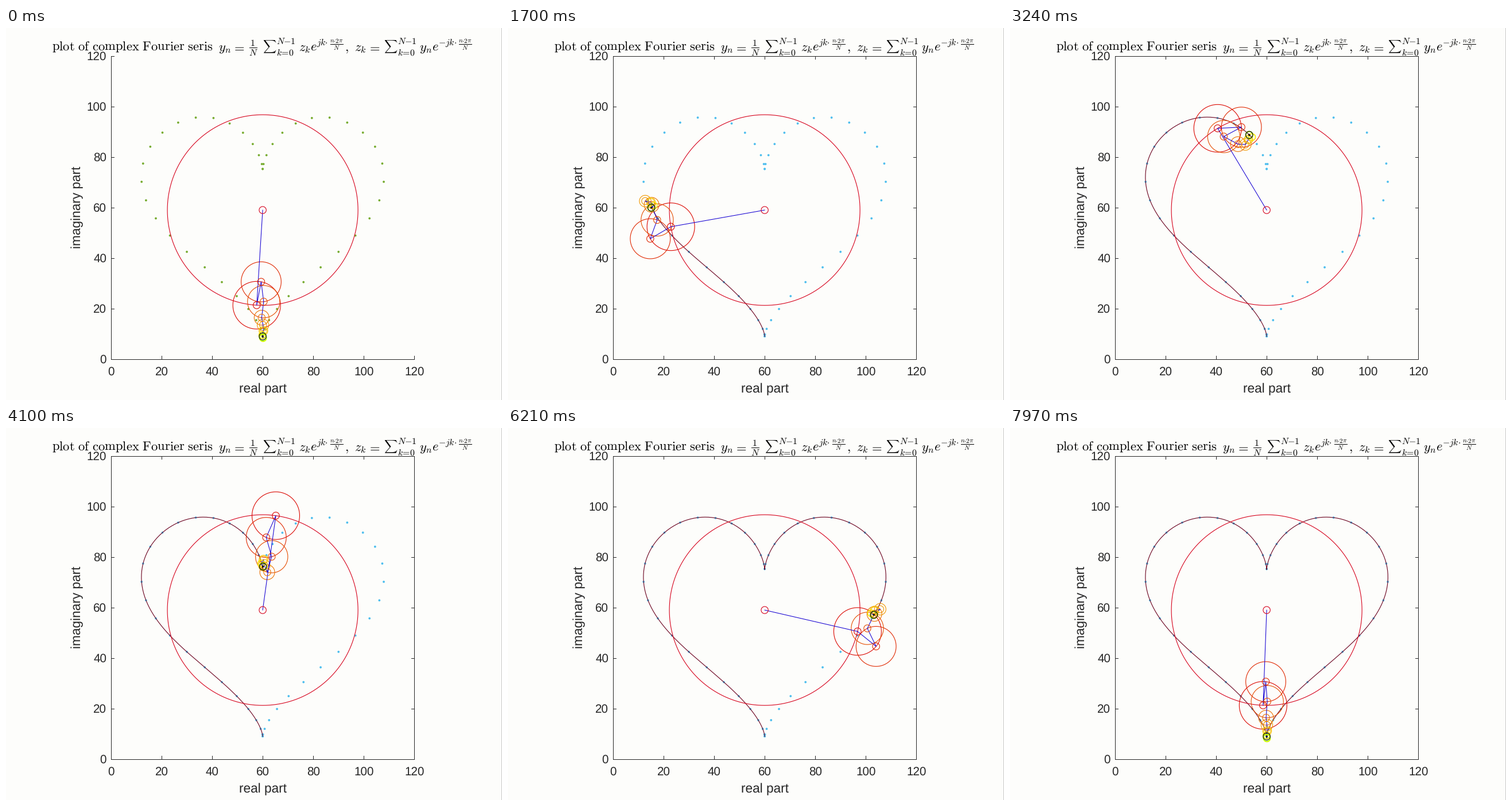
Write a matplotlib script that moves like this. It is 864 px wide and 648 px high and loops after 8000 ms.

```python
import colorsys

import matplotlib.pyplot as plt
import numpy as np
from matplotlib.animation import FuncAnimation
from matplotlib.collections import LineCollection, PolyCollection

W, H = 864, 648
FRAMES, LOOP_MS = 240, 8000
TOP, BOTTOM = 0.075 * H, 0.89 * H
SIDE = BOTTOM - TOP
LEFT = 0.5175 * W - SIDE / 2
RIGHT = LEFT + SIDE
SCALE = SIDE / 120
N, SHOWN = 50, 11
HUB = 6.15
INK = "#262626"
LABEL, TICK = 22.6, 20.57
SCRIPT = 0.7 * LABEL

plt.rcParams.update({
    "font.family": "Liberation Sans",
    "mathtext.fontset": "cm",
    "text.hinting": "none",
})


def to_px(z):
    """Complex plot coordinates to stage pixels."""
    z = np.asarray(z)
    return np.stack([LEFT + SCALE * z.real, BOTTOM - SCALE * z.imag], axis=-1)


# Heart samples; both ends of the parameter range are included.
t = np.linspace(-np.pi, np.pi, N)
heart = 60 + 60j + 3 * (
    16 * np.sin(t) ** 3
    + 1j * (13 * np.cos(t) - 5 * np.cos(2 * t) - 2 * np.cos(3 * t) - np.cos(4 * t))
)

# Fourier terms: the mean first, then by falling size.
coef = np.fft.fft(heart) / N
freq = np.fft.fftfreq(N, 1 / N)
order = np.r_[0, 1 + np.argsort(-np.abs(coef[1:]))]
coef, freq = coef[order], freq[order]
radii = np.abs(coef[1:SHOWN + 1])


def joints(n):
    return np.cumsum(coef * np.exp(2j * np.pi * freq * n / N))


path = to_px([joints(k / 10)[-1] for k in range(10 * N)])
turn = np.exp(1j * np.linspace(0, 2 * np.pi, 181))


def rings(centers, radius):
    """Circle outlines around complex centers, radius in plot units."""
    radius = np.broadcast_to(radius, np.shape(centers))
    return to_px(np.asarray(centers)[:, None] + radius[:, None] * turn)


hues = [colorsys.hsv_to_rgb(((1.25 * i - 1) / 50) % 1, 1, min(1, 0.84 + 0.02 * i))
        for i in range(SHOWN)]

fig = plt.figure(figsize=(W / 72, H / 72), dpi=72, facecolor="#fdfdfb")
ax = fig.add_axes([0, 0, 1, 1])
ax.set_xlim(0, W)
ax.set_ylim(H, 0)
ax.axis("off")


def line(xs, ys, color=INK, lw=1.0):
    return ax.plot(xs, ys, color=color, lw=lw)[0]


def text(x, y, s, size=LABEL, color="black", **kw):
    return ax.text(x, y, s, size=size, color=color, va="baseline", **kw)


def outlines(colors, lw, zorder):
    return ax.add_collection(
        LineCollection([], colors=colors, linewidths=lw, zorder=zorder), autolim=False)


def discs(color, zorder):
    return ax.add_collection(
        PolyCollection([], facecolors=color, edgecolors="none", zorder=zorder),
        autolim=False)


def draw_title():
    base = 40
    text(80, base, r"$\mathrm{plot\ of\ complex\ Fourier\ seris}$")
    text(423, base, r"$\frac{1}{N}$")
    text(590, base, "$,$")
    for x in (370, 720):
        text(x, base, "$y_n$")
    for x in (510, 607):
        text(x, base, "$z_k$")
    for x in (530, 742):
        text(x, base, "$e$")
    for x in (394, 630):
        text(x, base, "$=$")
    for x in (447, 658):
        text(x, base - 1.5, r"$\sum$", LABEL / 1.4)
        text(x + 24, 28, "$N{-}1$", SCRIPT)
        text(x + 24, 49, r"$k\!=\!0$", SCRIPT)
    text(541, 31, r"$jk{\cdot}$", SCRIPT)
    text(753, 31, r"${-}jk{\cdot}$", SCRIPT)
    for x in (564, 788):
        text(x, 31, r"$\frac{n{\cdot}2\pi}{N}$", SCRIPT)


def draw_axes():
    line([LEFT, LEFT, RIGHT], [TOP, BOTTOM, BOTTOM])
    box = [line([LEFT, RIGHT, RIGHT], [TOP, TOP, BOTTOM])]
    for v in range(0, 121, 20):
        x, y = to_px(v + 1j * v)
        line([x, x], [BOTTOM, BOTTOM - 5.3])
        line([LEFT, LEFT + 5.3], [y, y])
        box.append(line([x, x], [TOP, TOP + 5.3]))
        box.append(line([RIGHT, RIGHT - 5.3], [y, y]))
        text(x, 605, str(v), TICK, INK, ha="center")
        text(175, y + 7.3, str(v), TICK, INK, ha="right")
    text((LEFT + RIGHT) / 2, 635, "real part", color=INK, ha="center")
    text(130, (TOP + BOTTOM) / 2, "imaginary part", color=INK, ha="center",
         rotation=90, rotation_mode="anchor")
    return box


draw_title()
box = draw_axes()
line([W - 1, W - 1], [0, H], color="#c9c9c9")

dots = discs("#4dbeee", 1)
dots.set_verts(rings(heart, 1.9 / SCALE))
trail = line([], [], "#6e0824", 1.15)
circles = outlines(hues, 1.1, 2)
arms = line([], [], "#1400d2", 1.05)
hubs = outlines(hues, 1.1, 3)
tip = outlines("black", 1.1, 4)
pin = discs("black", 4)


def update(frame):
    n = np.round(frame * N / FRAMES, 1)
    z = joints(n)
    for part in box:
        part.set_visible(frame > 0)
    dots.set_facecolor("#77ac30" if frame == 0 else "#4dbeee")
    trail.set_data(*path[:int(round(n * 10)) + 1].T)
    circles.set_segments(rings(z[:SHOWN], radii))
    arms.set_data(*to_px(z).T)
    hubs.set_segments(rings(z[:SHOWN], HUB / SCALE))
    tip.set_segments(rings(z[-1:], HUB / SCALE))
    pin.set_verts(rings(z[-1:], 1.7 / SCALE))
    return [*box, dots, trail, circles, arms, hubs, tip, pin]


anim = FuncAnimation(fig, update, frames=FRAMES, interval=LOOP_MS / FRAMES,
                     repeat=True, repeat_delay=0, blit=False)
plt.show()
```
